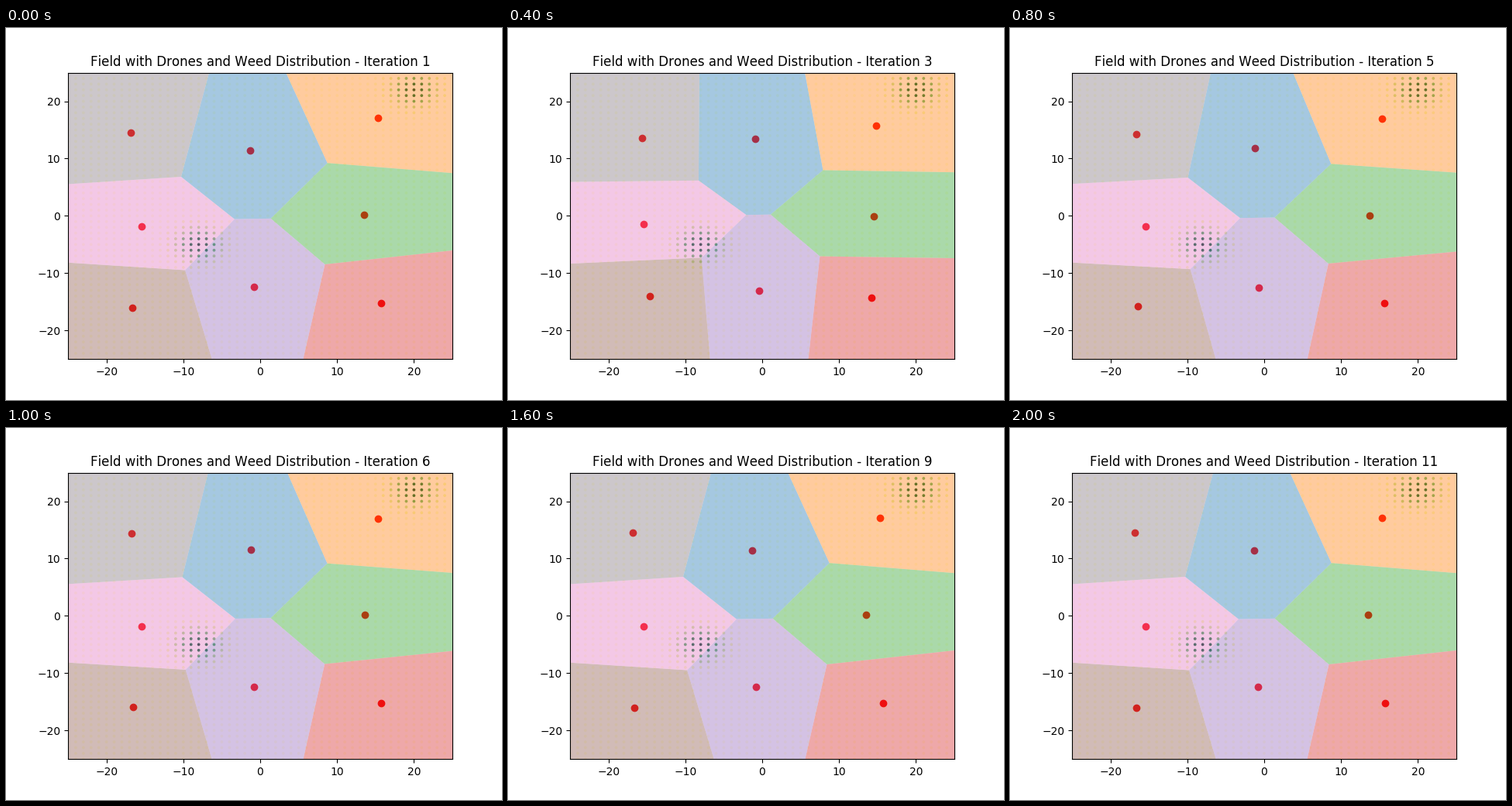
Write a matplotlib script that moves like this. It is 640x480 px and loops after 2200 ms.

```python
import numpy as np
import matplotlib.pyplot as plt
from matplotlib.animation import FuncAnimation

plt.rcParams["text.kerning_factor"] = 6  # whole-pixel kerning

HALF = 25
FRAMES = 11
STEP_MS = 200
DECAY = 0.45    # share of the way left after each iteration
LAST_MOVE = 6   # the layout is at rest after this frame

# Drone positions, clockwise from the top.
start = np.array([(-0.37, 16.10), (14.86, 15.69), (15.76, -0.26), (14.25, -14.34),
                  (-0.37, -13.12), (-14.62, -14.00), (-15.38, -1.46), (-14.08, 12.46)])
settled = np.array([(-1.28, 11.39), (15.34, 17.07), (13.51, 0.15), (15.77, -15.26),
                    (-0.78, -12.43), (-16.63, -15.99), (-15.41, -1.89), (-16.84, 14.51)])
leaders = np.isin(np.arange(len(start)), (0, 2, 7))
colors = [f"C{i}" for i in range(7)] + ["#80757d"]


def positions(frame):
    """Leaders close in at once, the others hold for one iteration and catch up."""
    if frame == 0 or frame > LAST_MOVE:
        return settled
    lead = DECAY ** (frame - 1)
    follow = 1 if frame < 3 else DECAY ** max(frame - 1, 3)
    left = np.where(leaders, lead, follow)[:, None]
    return settled + (start - settled) * left


def clip(poly, normal, limit):
    """Keep the part of a convex polygon where normal . p <= limit."""
    out = []
    for p, q in zip(poly, np.roll(poly, -1, axis=0)):
        dp, dq = normal @ p - limit, normal @ q - limit
        if dp <= 0:
            out.append(p)
        if dp * dq < 0:
            out.append(p + (q - p) * dp / (dp - dq))
    return np.array(out)


def voronoi_cell(points, i):
    poly = HALF * np.array([(-1.0, -1.0), (1, -1), (1, 1), (-1, 1)])
    for j, other in enumerate(points):
        if j != i:
            normal = other - points[i]
            poly = clip(poly, normal, normal @ (other + points[i]) / 2)
    return poly


def bump(x, y, cx, cy, sigma=2):
    return np.exp(-((x - cx) ** 2 + (y - cy) ** 2) / (2 * sigma ** 2))


fig, ax = plt.subplots(figsize=(6.4, 4.8), dpi=100)
ax.set_xlim(-HALF, HALF)
ax.set_ylim(-HALF, HALF)
title = ax.set_title("")

gx, gy = np.meshgrid(np.arange(-HALF, HALF), np.arange(-HALF, HALF))
weeds = bump(gx, gy, 20, 22) + bump(gx, gy, -8, -5)
ax.scatter(gx.ravel(), gy.ravel(), c=weeds.ravel(), cmap="YlGn", s=3)
drones = ax.scatter(*settled.T, color="red")

# Translucent cells lie over the drones and weeds.
cells = [ax.fill(*voronoi_cell(settled, i).T, color=color, alpha=0.4, lw=0)[0]
         for i, color in enumerate(colors)]


def update(frame):
    points = positions(frame)
    drones.set_offsets(points)
    for i, cell in enumerate(cells):
        cell.set_xy(voronoi_cell(points, i))
    title.set_text(f"Field with Drones and Weed Distribution - Iteration {frame + 1}")
    return [drones, title, *cells]


anim = FuncAnimation(fig, update, frames=FRAMES, interval=STEP_MS,
                     repeat=True, repeat_delay=0)
plt.show()
```
